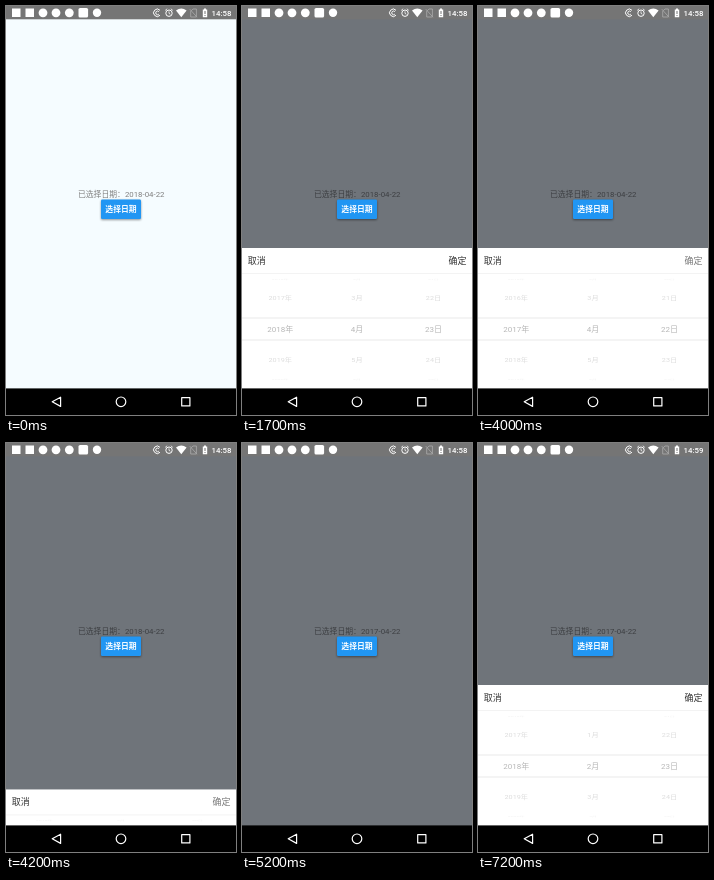
Recreate the animation shown at these times as an HTML page. Size 230x409 px, loop 8 s.

```html
<!DOCTYPE html>
<html lang="zh-CN">
<head>
<meta charset="utf-8">
<title>Date picker</title>
<style>
html, body { margin: 0; width: 100%; height: 100%; overflow: hidden; background: #000; }
svg { display: block; width: 100vw; height: 100vh; }
text { font: 7.84px Roboto, "Noto Sans CJK SC", "Noto Sans CJK", sans-serif; }
.mid { text-anchor: middle; }
.action { font-size: 9px; fill: #333; }
.wheel text { font-size: 8px; text-anchor: middle; }
.line { fill: none; stroke: #fff; }
#button rect { fill: #2196f3; filter: drop-shadow(0 1px .9px rgba(0, 0, 0, .42)); }
#button text { fill: #fff; font-weight: 700; }
#clock { fill: #fff; font-weight: 500; }
</style>
</head>
<body>
<svg viewBox="0 0 230 409" preserveAspectRatio="none">
  <rect width="230" height="409" fill="#f5fcff"/>
  <text id="label" class="mid" x="115.2" y="191" fill="#808080"></text>
  <rect id="dim" y="13" width="230" height="370" fill="rgb(8,12,18)" fill-opacity=".56"/>

  <g id="button">
    <rect x="95" y="193.5" width="40" height="19.5" rx="1.2"/>
    <text class="mid" x="115" y="206.3">选择日期</text>
  </g>

  <g id="panel">
    <rect y="242" width="230" height="141" fill="#fff"/>
    <text class="action" x="5.7" y="258">取消</text>
    <text id="confirm" class="action" x="224.5" y="258" text-anchor="end">确定</text>
    <path d="M0 267.5H230" stroke="#f3f3f3"/>
    <path d="M0 312H230M0 334H230" stroke="#e4e4e4" stroke-width=".8"/>
    <g class="wheel" id="wheels"></g>
  </g>

  <!-- status bar -->
  <rect width="230" height="13.3" fill="#757575"/>
  <g fill="#fff">
    <rect x="6" y="2.5" width="8.5" height="8.5"/>
    <rect x="19.5" y="2.5" width="8.5" height="8.5"/>
    <circle cx="37" cy="6.8" r="4.4"/>
    <circle cx="50" cy="6.8" r="4.4"/>
    <circle cx="63.3" cy="6.8" r="4.4"/>
    <rect x="72.5" y="2" width="9.6" height="9.6" rx="1.6"/>
    <circle cx="91" cy="6.8" r="4.2"/>
    <path d="M170 4.6Q175.3 .6 180.6 4.6L175.3 11.2Z"/>
    <path d="M196.8 3.6H198V2.6H200V3.6H201.2V11.2H196.8Z"/>
  </g>
  <path d="M199 5V8M199 9V10" stroke="#757575"/>
  <g class="line">
    <path d="M154 4.3A3.7 3.7 0 1 0 154 9.3M152.8 5.6A1.8 1.8 0 1 0 152.8 8.2"/>
    <circle cx="163" cy="7.2" r="3.2"/>
    <path d="M163 5.3V7.4L164.4 8.2M159.2 4.4L161.2 2.8M166.8 4.4L164.8 2.8" stroke-width=".8"/>
    <path d="M184.7 5.2L187 3H190.4V11H184.7ZM183.8 3.2L191 11.2" stroke="#a6a6a6" stroke-width=".9"/>
  </g>
  <text id="clock" x="205.6" y="9.8"></text>

  <!-- navigation bar -->
  <rect y="382.4" width="230" height="27" fill="#000"/>
  <g class="line" stroke-width="1.2" stroke-linejoin="round">
    <path d="M54.6 391.2V400.4L46.2 395.8Z"/>
    <circle cx="115" cy="395.8" r="4.8"/>
    <rect x="175.7" y="391.7" width="8.2" height="8.2"/>
  </g>
</svg>
<script>
const LOOP = 8000, STEP = 100;
const ROW_ANGLE = Math.PI / 5, RADIUS = 52.5, CENTER = 323, TRAVEL = 141;
const $ = id => document.getElementById(id);

const progress = (t, from, to) => Math.min(1, Math.max(0, (t - from) / (to - from)));
const easeInOut = p => p * p * (3 - 2 * p);
const easeOut = p => 1 - (1 - p) ** 2.6;
const turn = (t, from, to) => easeInOut(progress(t, from, to));

function makeWheel(x, unit, first) {
  const rows = [-2, -1, 0, 1, 2].map(offset => {
    const node = document.createElementNS("http://www.w3.org/2000/svg", "text");
    $("wheels").append(node);
    return { offset, node };
  });
  return position => rows.forEach(({ offset, node }) => {
    const value = Math.round(position) + offset;
    const distance = value - position;
    const cos = Math.cos(distance * ROW_ANGLE);
    const y = CENTER + RADIUS * Math.sin(distance * ROW_ANGLE);
    const size = .5 + .5 * cos;
    const grey = Math.round(Math.min(240, 184 + 36 * Math.abs(distance)));
    node.textContent = value < first ? "" : value + unit;
    node.setAttribute("transform", `translate(${x} ${y}) scale(${size} ${size * cos}) translate(0 2.9)`);
    node.setAttribute("fill", `rgb(${grey},${grey},${grey})`);
  });
}

const setYear = makeWheel(38.3, "年", 1900);
const setMonth = makeWheel(115, "月", 1);
const setDay = makeWheel(191.5, "日", 1);

// How far the panel is raised, 0 to 1.
function raised(t) {
  if (t < 4300) return easeOut(progress(t, 900, 1700)) * (1 - turn(t, 4000, 4300));
  return easeOut(progress(t, 5200, 6000));
}

function draw(t) {
  const firstVisit = t < 4300;
  const open = (t >= 900 && firstVisit) || t >= 5200;
  $("label").textContent = `已选择日期：${firstVisit ? 2018 : 2017}-04-22`;
  $("clock").textContent = t < 7000 ? "14:58" : "14:59";
  $("dim").style.display = $("panel").style.display = open ? "" : "none";
  $("panel").setAttribute("transform", `translate(0 ${TRAVEL * (1 - raised(t))})`);
  $("confirm").style.opacity = t >= 4000 && firstVisit ? .65 : 1;
  setYear(2018 - (firstVisit ? turn(t, 2900, 3400) : 0));
  setMonth(4 - turn(t, 6000, 6400) - turn(t, 6700, 7200));
  setDay(23 - (firstVisit ? turn(t, 2000, 2400) : 0));
}

const start = performance.now();
function tick() {
  const t = (performance.now() - start) % LOOP;
  draw(Math.floor(t / STEP) * STEP);
  requestAnimationFrame(tick);
}
tick();
</script>
</body>
</html>
```
